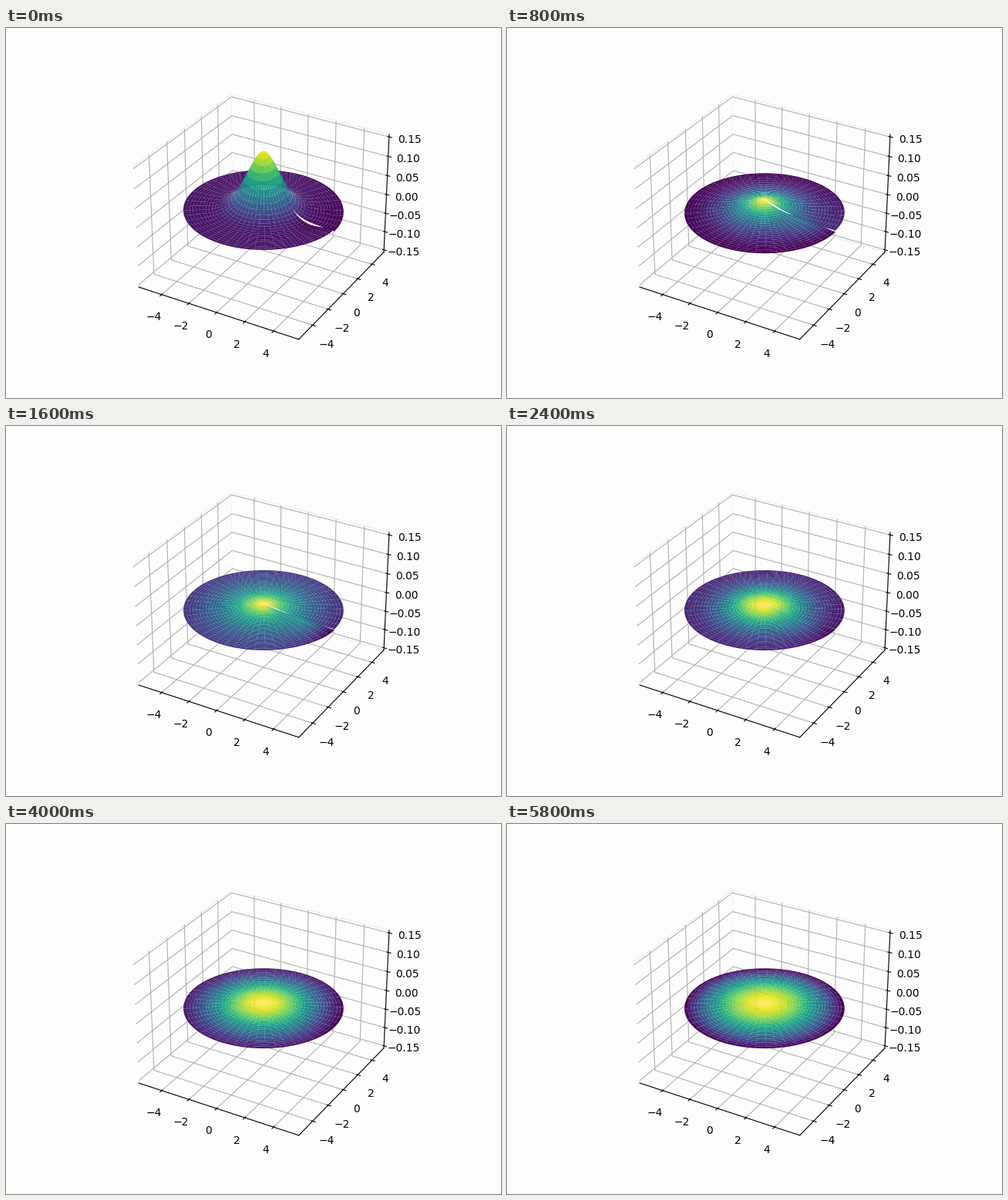
Animation, 642 px wide and 480 px high, one loop 6 s. Source, as a matplotlib script:

```python
import numpy as np
import matplotlib.pyplot as plt
from matplotlib.animation import FuncAnimation

FRAMES, INTERVAL = 30, 200
RADIUS = 5
PAPER = "#fdfdfd"

fig = plt.figure(figsize=(6.42, 4.8), dpi=100, facecolor=PAPER)
ax = fig.add_subplot(projection="3d", facecolor=PAPER)

r, theta = np.meshgrid(np.linspace(0, RADIUS, 26),
                       np.linspace(0, 2 * np.pi, 50), indexing="ij")
x, y = r * np.cos(theta), r * np.sin(theta)


def swing(i, decay):
    return np.exp(-i / decay) * np.cos(np.pi * i / 5)


def fade(angle, spread):
    return np.exp(-(angle / spread) ** 2)


def bell(i):
    """Spreading bump, 1 at the centre and 0 at the rim."""
    cusp = fade(i - 6, 4)
    width = 1.41 * np.exp(i / 21) + .5 * cusp
    power = 2 - cusp
    low = np.exp(-(RADIUS / width) ** power)
    return (np.exp(-(r / width) ** power) - low) / (1 - low)


def height(i):
    rim = .001 + .0063 * swing(i, 5)
    peak = .0095 + .1355 * np.exp(-i / 2.2)
    # The two edges meeting at angle zero do not quite join
    tilt = -.007 * swing(i, 9) * (r / RADIUS) ** 2
    gap = .006 * (1 - i) * np.exp(-i / 2.8) * np.sin(1.4 * (r - 2))
    return (rim + peak * bell(i) + tilt * fade(theta, .9)
            + (tilt - gap) * fade(2 * np.pi - theta, .4))


def padded(lo, hi):
    """Data margin of 5 % plus the box margin of 1/48."""
    pad = (hi - lo) * (.05 + 1.1 / 48)
    return lo - pad, hi + pad


def setup_axes():
    top = .15 * 25 / 24
    ax.set(xlim=padded(x.min(), x.max()), ylim=padded(y.min(), y.max()),
           zlim=(-top, top))
    ax.set_xticks(range(-4, 5, 2))
    ax.set_yticks(range(-4, 5, 2))
    ax.set_zticks(np.linspace(-.15, .15, 7))
    for axis in (ax.xaxis, ax.yaxis, ax.zaxis):
        axis.set_pane_color(PAPER)
        axis.pane.set_edgecolor("#f0f0f0")


surface = None


def draw(i):
    global surface
    if surface is not None:
        surface.remove()
    surface = ax.plot_surface(x, y, height(i), cmap="viridis")
    return surface,


setup_axes()
anim = FuncAnimation(fig, draw, frames=FRAMES, interval=INTERVAL,
                     init_func=lambda: (), repeat=True, repeat_delay=0)
plt.show()
```
